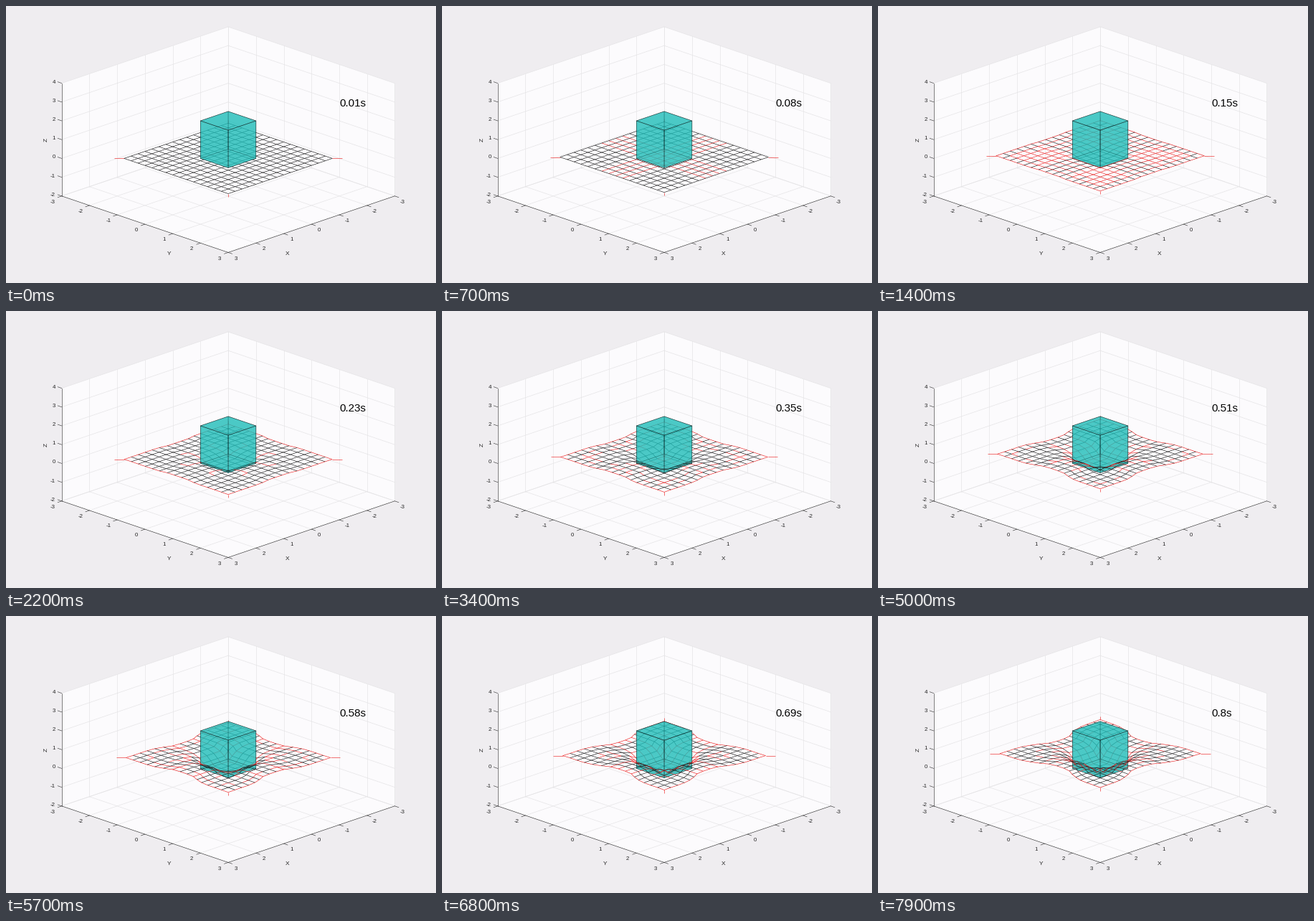
A matplotlib script for the animation above (8000 ms loop, 600 by 386 pixels).

```python
import numpy as np
import matplotlib.pyplot as plt
from matplotlib.animation import FuncAnimation
from matplotlib.collections import LineCollection

W, H, DPI = 600, 386, 100
FRAMES, STEP_MS = 80, 100
PX = 72 / DPI
INK = "#262626"
RED = (0.93, 0.1, 0.1)
BLACK = (0.08, 0.08, 0.08)

# Net: N x N nodes flying upward, one heavy weight tethered to each corner
N, GAP = 16, 0.25
SPEED, WAVE, DAMP = 1.0, 45.0, 8.0
WEIGHT = 16.0
CUBE, TALL = 0.5, 2.0
SUB, DT = 20, 0.0005


def project(p):
    """Isometric view: world points to stage pixels."""
    p = np.asarray(p, float)
    x, y, z = p[..., 0], p[..., 1], p[..., 2]
    return np.stack([310.05 + 38.73 * (y - x),
                     212.4 + 13.1 * (x + y) - 26.2 * z], -1)


def build_net():
    c = (np.arange(N) - (N - 1) / 2) * GAP
    gx, gy = np.meshgrid(c, c, indexing="ij")
    pos = np.stack([gx.ravel(), gy.ravel(), 0 * gx.ravel()], 1)
    idx = np.arange(N * N).reshape(N, N)
    links = [np.stack([idx[:-1].ravel(), idx[1:].ravel()], 1),
             np.stack([idx[:, :-1].ravel(), idx[:, 1:].ravel()], 1)]
    threads = np.bincount(np.vstack(links).ravel())
    corners = idx[[0, 0, -1, -1], [0, -1, 0, -1]]
    ends = pos[corners] + np.sign(pos[corners]) * GAP / np.sqrt(2)
    links.append(np.stack([corners, N * N + np.arange(4)], 1))
    vel = np.zeros((N * N + 4, 3))
    vel[:, 2] = SPEED
    mass = np.append(threads / 4, [WEIGHT] * 4)
    return np.vstack([pos, ends]), vel, mass, np.vstack(links)


def collide(pos, vel):
    """Push nodes out of the cube through the nearest face."""
    ax, ay, z = abs(pos[:, 0]), abs(pos[:, 1]), pos[:, 2]
    inside = (ax < CUBE) & (ay < CUBE) & (z > 0) & (z < TALL)
    depth = np.stack([CUBE - ax, CUBE - ay, z], 1)
    face = depth.argmin(1)
    for k in range(3):
        hit = inside & (face == k)
        pos[hit, k] = CUBE * np.sign(pos[hit, k]) if k < 2 else 0
        vel[hit, k] = 0


def simulate():
    pos, vel, mass, links = build_net()
    a, b = links.T
    k = (WAVE / GAP) ** 2
    # tethers start drawn tight, the net just slack
    limit = GAP * np.where(b >= N * N, 1 - 1e-4, 1 + 2e-4)
    states = []
    for _ in range(FRAMES):
        ends = np.stack([pos[a], pos[b]], 1)
        size = np.linalg.norm(pos[b] - pos[a], axis=1)
        states.append((ends, size > limit))
        for _ in range(SUB):
            d = pos[b] - pos[a]
            size = np.linalg.norm(d, axis=1)
            unit = d / size[:, None]
            rate = ((vel[b] - vel[a]) * unit).sum(1)
            pull = np.where(size > GAP,
                            np.maximum(k * (size - GAP) + DAMP * rate, 0), 0)
            f = pull[:, None] * unit
            force = np.zeros_like(pos)
            np.add.at(force, a, f)
            np.add.at(force, b, -f)
            vel += DT * force / mass[:, None]
            pos += DT * vel
            collide(pos, vel)
    return states


fig = plt.figure(figsize=(W / DPI, H / DPI), dpi=DPI, facecolor="#efedf0")
ax = fig.add_axes([0, 0, 1, 1])
ax.set_xlim(0, W)
ax.set_ylim(H, 0)
ax.axis("off")


def poly(pts, z, **kw):
    ax.add_patch(plt.Polygon(project(pts), zorder=z, **kw))


def line(p, q, color, width, z):
    ax.plot(*np.array([p, q]).T, color=color, lw=width * PX, zorder=z)


def label(x, y, s, size=7.9, **kw):
    kw = {"ha": "center", "va": "center_baseline", "color": INK, **kw}
    return ax.text(x, y, s, fontsize=size * PX, family="Liberation Sans",
                   zorder=9, **kw)


def draw_axes():
    lo, hi, bot, top = -3, 3, -2, 4
    panes = ([(lo, lo, bot), (hi, lo, bot), (hi, hi, bot), (lo, hi, bot)],
             [(lo, lo, bot), (hi, lo, bot), (hi, lo, top), (lo, lo, top)],
             [(lo, lo, bot), (lo, hi, bot), (lo, hi, top), (lo, lo, top)])
    for pane in panes:
        poly(pane, 0, fc="#fcfbfd", ec="none")
    grid = []
    for v in range(lo, hi + 1):
        grid += [[(v, lo, bot), (v, hi, bot)], [(lo, v, bot), (hi, v, bot)],
                 [(v, lo, bot), (v, lo, top)], [(lo, v, bot), (lo, v, top)]]
    for v in range(bot, top + 1):
        grid += [[(lo, lo, v), (hi, lo, v)], [(lo, lo, v), (lo, hi, v)]]
    for p, q in grid:
        line(project(p), project(q), "#e6e5e7", 0.7, 1)

    for p, q in ([(hi, lo, bot), (hi, hi, bot)], [(lo, hi, bot), (hi, hi, bot)],
                 [(hi, lo, bot), (hi, lo, top)]):
        line(project(p), project(q), INK, 0.55, 2)
    for v in range(lo, hi + 1):
        for p, s in (((hi, v, bot), -1), ((v, hi, bot), 1)):
            x, y = project(p)
            line((x, y), (x + 5.5 * s, y + 1.9), INK, 0.55, 2)
            label(x - 0.6 + 11.5 * s, y + 7.6, str(v))
    for v in range(bot, top + 1):
        x, y = project((hi, lo, v))
        line((x, y), (x - 5.5, y - 1.9), INK, 0.55, 2)
        label(x - 8.6, y - 2.4, str(v), ha="right")
    label(227.6, 344.6, "Y", 8.4)
    label(392.6, 344.6, "X", 8.4)
    label(56, 186.5, "Z", 8.4, rotation=90, va="center")


def draw_cube():
    c, t = CUBE, TALL

    def side(axis, s):
        corners = []
        for u, z in ((-c, 0), (c, 0), (c, t), (-c, t)):
            corners.append((s, u, z) if axis == 0 else (u, s, z))
        return corners

    def cap(z):
        return [(-c, -c, z), (c, -c, z), (c, c, z), (-c, c, z)]

    for z, faces in ((4, (cap(0), side(0, -c), side(1, -c))),
                     (5, (side(0, c), side(1, c), cap(t)))):
        for f in faces:
            poly(f, z, fc=(0.12, 0.74, 0.725, 0.55), ec="none")
        for f in faces:
            poly(f, z + 0.5, fc="none", ec=(0, 0, 0, 0.5), lw=0.6 * PX,
                 joinstyle="round")


draw_axes()
draw_cube()
rear, front = (LineCollection([], linewidths=0.6 * PX, zorder=z)
               for z in (3, 7))
ax.add_collection(rear)
ax.add_collection(front)
clock = label(465.4, 140, "", 15.1, ha="left", va="baseline", color="black")
states = simulate()


def update(i):
    ends, taut = states[i]
    near = ends[..., :2].mean(1).max(1) > CUBE
    segs = project(ends)
    colors = np.where(taut[:, None], RED, BLACK)
    for coll, pick in ((rear, ~near), (front, near)):
        # black over red where lines meet
        order = np.flatnonzero(pick)
        order = order[np.argsort(~taut[order], kind="stable")]
        coll.set_segments(segs[order])
        coll.set_color(colors[order])
    clock.set_text(f"{(i + 1) / 100:g}s")
    return rear, front, clock


anim = FuncAnimation(fig, update, frames=FRAMES, interval=STEP_MS,
                     repeat=True, repeat_delay=0)
plt.show()
```
